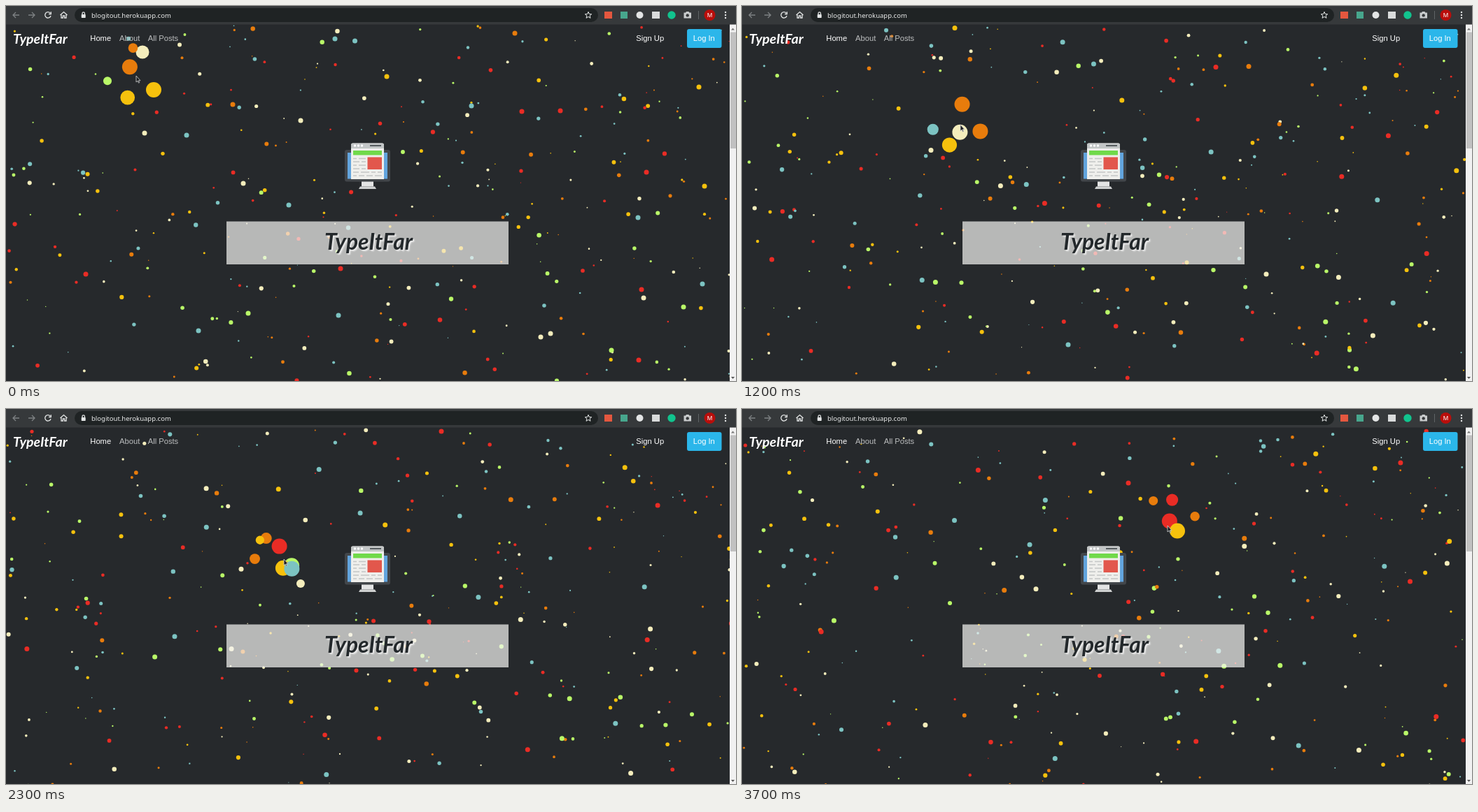
An HTML page with a canvas for the animation above (3.8 s loop, 1043 px wide and 537 px high).

```html
<!DOCTYPE html>
<html lang="en">
<head>
<meta charset="utf-8">
<title>Blog landing page</title>
<style>
  html, body { margin: 0; width: 100%; height: 100%; overflow: hidden; background: #26292c; }
  canvas, svg { position: absolute; left: 0; top: 0; }
  text { font-family: "Liberation Sans", Arial, sans-serif; font-size: 11.2px; fill: #fff; }
  .dim { fill: #bcbebf; }
  .url { font-family: "Noto Sans", sans-serif; font-size: 9.5px; fill: #eceded; }
  .brand { font: italic 700 19.6px Lato, sans-serif; }
  .title { font: italic 700 31.8px Lato, sans-serif; fill: #23282b; text-anchor: middle;
           text-shadow: 2px 2px 2px #eee; }
  .line { fill: none; stroke: #e4e6e6; stroke-width: 1.3; }
</style>
</head>
<body>
<canvas id="dots" width="1043" height="537"></canvas>
<svg width="1043" height="537" viewBox="0 0 1043 537">
  <!-- browser bar -->
  <rect width="1043" height="26.5" fill="#36393b"/>
  <rect x="98" y="3" width="748" height="20" rx="10" fill="#1f2324"/>
  <g class="line">
    <path d="M19 13H10M14 9l-4 4 4 4M32 13h9M37 9l4 4-4 4" stroke="#7d8183"/>
    <path d="M63.2 10.2A4.2 4.2 0 1 0 64 14M64.3 8.3v3.2h-3.2"/>
    <path d="M77.5 13l5-4.5 5 4.5M79 12.5V17h2.4v-3h2.2v3H86v-4.5"/>
    <path d="M109 12.5v-2a1.7 1.7 0 0 1 3.4 0v2"/>
    <path d="M832 8.3l1.3 3.2 3.4.2-2.6 2.2.9 3.4-3-1.9-3 1.9.9-3.4-2.6-2.2 3.4-.2z" stroke-width="1"/>
    <path d="M989.5 7v12" stroke="#606466" stroke-width="1"/>
  </g>
  <rect x="107.7" y="12" width="6" height="5" rx=".7" fill="#e4e6e6"/>
  <text class="url" x="122" y="16.5">blogitout.herokuapp.com</text>
  <rect x="855" y="8" width="11" height="10" fill="#e4573f"/>
  <rect x="878" y="8" width="10" height="10" fill="#47a68d"/>
  <circle cx="905.5" cy="13" r="5" fill="#e3e5e5"/>
  <rect x="923" y="8" width="11" height="10" fill="#d9dbdb"/>
  <circle cx="951" cy="13" r="5.7" fill="#11c48e"/>
  <path d="M968.5 9.5h2.5l1-1.5h3.500l1 1.500h2.500v8h-10.500z" fill="#c9cccd"/>
  <circle cx="973.7" cy="13.4" r="2.2" fill="#36393b"/>
  <circle cx="1005.5" cy="13" r="8" fill="#b90e0b"/>
  <text x="1005.5" y="16.2" text-anchor="middle" style="font-size:9px">M</text>
  <g fill="#e4e6e6"><circle cx="1028" cy="9" r="1.2"/><circle cx="1028" cy="13" r="1.2"/><circle cx="1028" cy="17" r="1.2"/></g>

  <!-- page header -->
  <text class="brand" x="10" y="54">TypeItFar</text>
  <text x="120.3" y="50">Home</text>
  <text class="dim" x="162" y="50">About</text>
  <text class="dim" x="202.700" y="50">All Posts</text>
  <text x="900.300" y="50">Sign Up</text>
  <rect x="973" y="33" width="49.500" height="27" rx="3" fill="#2bb6ea"/>
  <text x="981.700" y="50">Log In</text>

  <!-- monitor -->
  <rect x="484" y="206" width="65" height="45.500" rx="3" fill="#42464a"/>
  <rect x="488" y="210" width="57" height="37.500" fill="#62a4dd"/>
  <path d="M508 251.500h17v7h-17z" fill="#e3e4e4"/>
  <path d="M506 258.500h21l2 3.500h-25z" fill="#cfd1d1"/>
  <path d="M493 248v-49q0-2.500 2.500-2.500h42q2.500 0 2.500 2.500v49z" fill="#efefec"/>
  <path d="M493 204v-5q0-2.500 2.500-2.500h42q2.500 0 2.500 2.500v5z" fill="#c3c6c7"/>
  <g fill="#fff"><circle cx="498.500" cy="200" r="1.700"/><circle cx="503.500" cy="200" r="1.700"/><circle cx="508.500" cy="200" r="1.700"/></g>
  <path d="M520 200h16" stroke="#555b5e" stroke-width="2"/>
  <rect x="496" y="207" width="41" height="6.500" fill="#70d94a"/>
  <rect x="516.500" y="216.500" width="20.500" height="17.500" fill="#e2574c"/>
  <path d="M496 218.500h5m3 0h10M496 223h9m3 0h6M496 228h5m3 0h10M496 233h9m3 0h6M496 238h8m3 0h12m3 0h6m3 0h6M496 243h5m3 0h8m3 0h9m3 0h10"
        stroke="#c4c6c6" stroke-width="1.500"/>

  <!-- banner -->
  <rect x="315" y="308.500" width="403" height="61.500" fill="#f5f5f3" fill-opacity=".7"/>
  <text class="title" x="518" y="349">TypeItFar</text>

  <!-- scrollbar -->
  <rect x="1034" y="26.500" width="9" height="511" fill="#f1f1f1"/>
  <rect x="1035" y="37.500" width="8" height="166.500" fill="#c1c1c1"/>
  <path d="M1036 34.500l2.500-3 2.500 3z" fill="#777"/>
  <path d="M1036 531l2.500 3 2.500-3z" fill="#555"/>

  <path id="cursor" d="M0 0v9l2-1.800 1.500 3 1.200-.6-1.400-2.800h2.700z" fill="#1b1d1f" stroke="#d5d7d7" stroke-width=".8"/>
</svg>
<script>
const LOOP = 3800, STEP = 100, WIDTH = 1043, TOP = 27, BOTTOM = 540;
const RED = "#e92c25", ORANGE = "#e87c0c", YELLOW = "#f6c10d",
      GREEN = "#b9f868", CREAM = "#f4edbc", TEAL = "#7cc3c2";
const colors = [RED, ORANGE, YELLOW, GREEN, CREAM, TEAL];

// Large dots: x, y, velocity x, velocity y
const large = {
  [RED]: [[915, 238, 7, -43.5], [737, 151, -50, -53], [792, 150, 54, 78.5], [904, 507, -69, -8.4],
    [908, 406, 58.5, -43], [114, 384, -59.5, -17.6], [478, 376, -38, -78]],
  [ORANGE]: [[727, 39, -2.5, 39.5], [324, 141, 13.7, 32]],
  [YELLOW]: [[544, 101, -1, 28.3], [998, 258, 19, -18.5], [990, 116, -46, -14], [211, 120, 77.5, -75.5]],
  [GREEN]: [[865, 493, -26, -34], [968, 431, -75.5, 74], [346, 440, -58, -37]],
  [CREAM]: [[764, 474, -12.5, -75], [778, 469, 62, -67], [911, 418, -8, 45], [421, 164, -43, 78],
    [339, 254, -23, -61], [198, 182, 60, 20.5]],
  [TEAL]: [[498.5, 11, 3.3, 60], [665, 143, 4.3, 55], [995, 398, -54, 22.7], [903, 303, 4, -21],
    [475, 443, -7.5, 35], [275, 465, -14.8, -60.5], [258, 185, 12.3, -6.9], [404, 285, 1.9, -24.5],
    [470, 47, -9.9, -31.5]]
};

// Pointer: seconds, x, y
const path = [[0, 186, 100], [.5, 249, 115], [1.2, 312, 170], [1.7, 385, 104],
  [2.3, 397, 215], [3.2, 477, 99], [3.7, 608, 167]];

let seed = 20;
const random = () => (seed = (seed * 16807) % 2147483647) / 2147483647;
const spread = () => (random() - .5) * 150;

const dots = [];
for (let i = 0; i < 330; i++) {
  dots.push({
    x: random() * WIDTH, y: TOP + random() * (BOTTOM - TOP),
    vx: spread(), vy: spread(),
    r: .6 + random() * 2.7, color: colors[i % 6]
  });
}
for (const color in large) {
  for (const [x, y, vx, vy] of large[color]) dots.push({ x, y, vx, vy, r: 3.5, color });
}

// Reflects a straight course between two walls
function bounce(v, low, high) {
  const span = high - low;
  const p = (((v - low) % (2 * span)) + 2 * span) % (2 * span);
  return low + (p > span ? 2 * span - p : p);
}

function pointerAt(t) {
  let i = 0;
  while (i < path.length - 2 && t >= path[i + 1][0]) i++;
  const a = path[i], b = path[i + 1], span = b[0] - a[0];
  const u = Math.min(1, (t - a[0]) / span);
  const slope = (j, k) => {
    const p = path[Math.max(0, j - 1)], q = path[Math.min(path.length - 1, j + 1)];
    return (q[k] - p[k]) / (q[0] - p[0]) * span;
  };
  return [1, 2].map(k => {
    const s = u * u * (3 - 2 * u);
    return a[k] + (b[k] - a[k]) * s
      + slope(i, k) * u * (1 - u) ** 2 - slope(i + 1, k) * u * u * (1 - u);
  });
}

const ctx = document.getElementById("dots").getContext("2d");
const cursor = document.getElementById("cursor");

function draw(t) {
  const [mx, my] = pointerAt(t);
  cursor.setAttribute("transform", `translate(${mx} ${my})`);
  ctx.fillStyle = "#26292c";
  ctx.fillRect(0, 0, WIDTH, 537);
  for (const d of dots) {
    const x = bounce(d.x + d.vx * t, d.r, WIDTH - d.r);
    const y = bounce(d.y + d.vy * t, TOP + d.r, BOTTOM - d.r);
    const near = Math.max(0, Math.min(1, (52 - Math.hypot(x - mx, y - my)) / 20));
    ctx.fillStyle = d.color;
    ctx.beginPath();
    ctx.arc(x, y, d.r + (11 - d.r) * near, 0, 2 * Math.PI);
    ctx.fill();
  }
}

const start = performance.now();
function frame() {
  const ms = (performance.now() - start) % LOOP;
  draw(Math.floor(ms / STEP) * STEP / 1000);
  requestAnimationFrame(frame);
}
frame();
</script>
</body>
</html>
```
